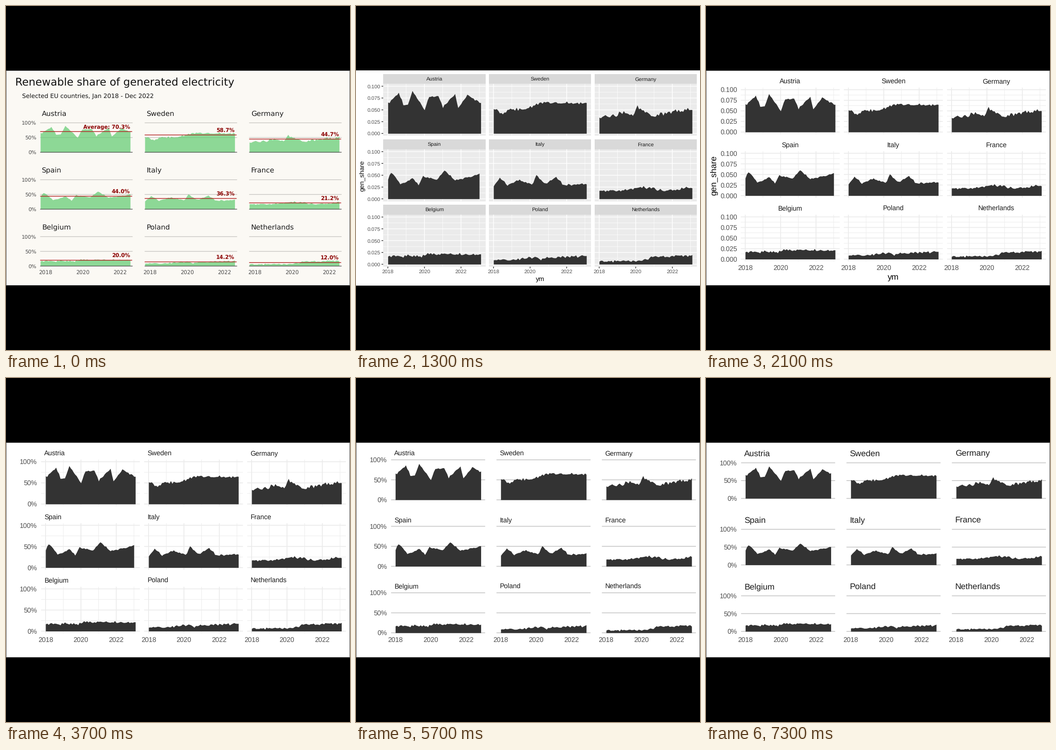
Recreate the animation shown at these times as a matplotlib script. Size 748 by 748 pixels, loop 8 s.

```python
import itertools

import numpy as np
import matplotlib.pyplot as plt
from matplotlib.animation import FuncAnimation
from matplotlib.patches import Rectangle

SIZE, DPI = 748, 88
PT = 72 / DPI  # points per pixel
SANS, WIDE = "Liberation Sans", "DejaVu Sans"
DARK, LABEL, PALE = "#333333", "#4d4d4d", "#ebebeb"

plt.rcParams["text.hinting"] = "none"
order = itertools.count(1)
countries = []


def country(name, mean, noise, turns, last=61):
    """Monthly shares in percent: runs between turning points plus noise."""
    rng = np.random.default_rng(len(countries) + 3)
    months = np.arange(last + 1)
    share = np.interp(months, list(turns), list(turns.values()))
    countries.append((name, mean, share + rng.normal(0, noise, months.size)))


country("Austria", 70.3, 1, {0: 64, 7: 87, 10: 60, 13: 62, 16: 90, 24: 50, 27: 78,
                             33: 79, 36: 57, 44: 84, 46: 53, 52: 82, 61: 65})
country("Sweden", 58.7, 1.6, {0: 53, 6: 42, 9: 50, 22: 53, 30: 66, 61: 64})
country("Germany", 44.7, 2.6, {0: 36, 10: 37, 16: 48, 22: 38, 25: 58, 35: 38,
                               49: 49, 61: 48})
country("Spain", 44.0, 1, {0: 40, 2: 58, 8: 31, 16: 43, 20: 30, 23: 49, 32: 40,
                           37: 61, 44: 39, 60: 53}, last=60)
country("Italy", 36.3, 1.3, {0: 27, 4: 46, 9: 29, 17: 42, 25: 31, 28: 51, 34: 32,
                             41: 47, 46: 29, 61: 32})
country("France", 21.2, 1.4, {0: 20, 12: 16, 28: 26, 44: 18, 61: 24})
country("Belgium", 20.0, 1.5, {0: 18, 23: 17, 26: 23, 61: 21})
country("Poland", 14.2, 1.9, {0: 11, 8: 9, 25: 16, 30: 12, 61: 20})
country("Netherlands", 12.0, 1.4, {0: 6, 22: 8, 32: 11, 34: 16, 61: 19})

fig = plt.figure(figsize=(SIZE / DPI, SIZE / DPI), dpi=DPI, facecolor="black")
pages = []


def page(back, edge):
    ax = fig.add_axes([0, 0, 1, 1], label=f"page{len(pages)}")
    ax.set_axis_off()
    ax.set_xlim(0, SIZE)
    ax.set_ylim(SIZE, 0)
    ax.set_autoscale_on(False)
    rect(ax, 0, 140, 748, 608, edge)
    rect(ax, 1, 141, 747, 607, back)
    pages.append(ax)
    return ax


def rect(ax, x0, y0, x1, y1, color):
    ax.add_patch(Rectangle((x0, y0), x1 - x0, y1 - y0, color=color, lw=0,
                           zorder=next(order)))


def hline(ax, ys, x0, x1, color, width):
    ax.hlines(ys, x0, x1, colors=color, linewidth=width * PT, snap=False,
              zorder=next(order))


def vline(ax, xs, y0, y1, color, width):
    ax.vlines(xs, y0, y1, colors=color, linewidth=width * PT, snap=False,
              zorder=next(order))


def text(ax, x, y, s, size, color, ha="left", font=SANS, **kw):
    kw.setdefault("va", "baseline")
    ax.text(x, y, s, fontsize=size * PT, color=color, ha=ha, family=font,
            zorder=next(order), **kw)


def area(ax, share, x0, step, zero, unit, end=61, color=DARK, alpha=1):
    share = share[:end + 1]
    xs = x0 + step * np.arange(share.size)
    ax.fill_between(xs, zero, zero - unit * share, color=color, alpha=alpha,
                    lw=0, zorder=next(order))


def year_marks(x0, step, end):
    xs = [x0 + step * m for m in range(0, 61, 12) if m <= end * 1.05]
    return xs[::2], xs[1::2]


def axis_titles(ax, left, right, base, x, size):
    text(ax, (left + right) / 2, base, "ym", size, "black", "center")
    text(ax, x, 369, "gen_share", size, "black", "center", va="center",
         rotation=90)


def styled():
    """The finished chart with colours, means and headings."""
    ax = page("#fbf9f4", "#505050")
    text(ax, 19.6, 173.5, "Renewable share of generated electricity", 23.15,
         "#111111", font=WIDE)
    text(ax, 35.2, 200.5, "Selected EU countries, Jan 2018 - Dec 2022", 13.15,
         "#111111", font=WIDE)
    for k, (name, mean, share) in enumerate(countries):
        row, col = divmod(k, 3)
        left, zero = 74.3 + 227.2 * col, 318 + 123.75 * row
        right = left + 201
        text(ax, left + 4, zero - 79.4, name, 15.4, "#1a1a1a", font=WIDE)
        hline(ax, [zero - 64, zero - 32], left, right, "#c4c2be", 1.3)
        area(ax, share, left + 0.4, 3.37, zero, 0.64, 58, "#5fcb6f", 0.7)
        hline(ax, zero, left, right, "#4a4a4a", 1.3)
        y = zero - 0.64 * mean
        hline(ax, y, left, right - 1, "#b22222", 1.5)
        lead = "Average: " if k == 0 else ""
        text(ax, left + 195.3, y - 5.5, f"{lead}{mean:.1f}%", 11.5, "#8b0000",
             "right", WIDE, weight="bold")
        if col == 0:
            for v in (0, 50, 100):
                text(ax, 66, zero - 0.64 * v + 4.2, f"{v}%", 11.2, LABEL,
                     "right", WIDE)
        if row == 2:
            for j in range(3):
                text(ax, left + 11.9 + 81 * j, 583.5, str(2018 + 2 * j), 11.6,
                     LABEL, "center", WIDE)


def grey(top=100, left=59.2, fmt=lambda v: f"{v / 1000:.3f}"):
    """Grey panels with strips; top is the upper limit of the share."""
    ax = page("white", "white")
    right, gap, height = 741, 7.4, 113
    width = (right - left - 2 * gap) / 3
    unit = height / (1.1 * top)
    step = width / 1.1 / 61
    ticks = range(0, int(top) + 1, 25)
    for k, (name, _, share) in enumerate(countries):
        row, col = divmod(k, 3)
        x, y = left + (width + gap) * col, 169.3 + 142.2 * row
        x1, y1 = x + width, y + height
        zero, start = y1 - 0.05 * top * unit, x + width * 0.05 / 1.1
        rect(ax, x, y - 21.6, x1, y, "#d9d9d9")
        rect(ax, x, y, x1, y1, PALE)
        text(ax, (x + x1) / 2, y - 6.6, name, 11.4, "#1a1a1a", "center")
        major, minor = year_marks(start, step, 61)
        levels = [zero - unit * v for v in ticks]
        hline(ax, [zero - unit * (v + 12.5) for v in range(0, 100, 25)], x, x1,
              "white", 0.75)
        vline(ax, minor, y, y1, "white", 0.75)
        hline(ax, levels, x, x1, "white", 1.5)
        vline(ax, major, y, y1, "white", 1.5)
        area(ax, share, start, step, zero, unit)
        if col == 0:
            hline(ax, levels, x - 3.7, x, DARK, 1.5)
            for v, level in zip(ticks, levels):
                text(ax, x - 6, level + 4.2, fmt(v), 11.4, LABEL, "right")
        if row == 2:
            vline(ax, major, y1, y1 + 3.7, DARK, 1.5)
            for j, mx in enumerate(major):
                text(ax, mx, 581.3, str(2018 + 2 * j), 11.4, LABEL, "center")
    axis_titles(ax, left, right, 597.8, 13.5, 14.3)


def minimal(left=76.3, gap=9.2, bottom=278.7, height=101.2, pitch=138.2, end=61,
            pad=0.05, percent=True, titles=False, align="left", grid=PALE,
            minors=True, years=True, strip=14.6, base=168.8, dark=False):
    """Bare panels without strips or ticks."""
    ax = page("black", "black") if dark else page("white", "#505050")
    right = 739.2
    width = (right - left - 2 * gap) / 3
    unit = height / (1 + 2 * pad) / 100
    step = width / 1.1 / end
    gaps = 50 if percent else 25
    ticks = range(0, 101, gaps)
    for k, (name, _, share) in enumerate(countries):
        row, col = divmod(k, 3)
        x, y1 = left + (width + gap) * col, bottom + pitch * row
        x1, y = x + width, y1 - height
        zero, start = y1 - 100 * pad * unit, x + width * 0.05 / 1.1
        major, minor = year_marks(start, step, end)
        levels = [zero - unit * v for v in ticks]
        if minors:
            hline(ax, [v - unit * gaps / 2 for v in levels[:-1]], x, x1, grid, 0.95)
        if years:
            vline(ax, minor, y, y1, grid, 0.95)
        hline(ax, levels, x, x1, grid, 1.8)
        if years:
            vline(ax, major, y, y1, grid, 1.8)
        area(ax, share, start, step, zero, unit, end)
        tx = x + 7 if align == "left" else (x + x1) / 2
        text(ax, tx, base + pitch * row, name, strip, "#1a1a1a", align)
        if col == 0:
            for v, level in zip(ticks, levels):
                label = f"{v}%" if percent else f"{v / 1000:.3f}"
                text(ax, 67.7, level + 5.2, label, 14.6, LABEL, "right")
        if row == 2:
            for j, mx in enumerate(major):
                text(ax, mx, 574, str(2018 + 2 * j), 14.6, LABEL, "center")
    if titles:
        axis_titles(ax, left, right, 595, 17, 18.4)


styled()
grey(90.5)
grey(left=63, fmt=lambda v: f"{v / 10:.1f}%")
grey()

# Each call below adds one more change to the look so far
look = dict(left=75.6, percent=False, titles=True, align="center")
minimal(**look, dark=True)
for change in (
    dict(),
    dict(titles=False),
    dict(align="left"),
    dict(left=76.3, percent=True),
    dict(minors=False),
    dict(gap=24.6, bottom=264.9, height=87, pitch=144.6),
    dict(end=58),
    dict(years=False, grid="#cacaca"),
    dict(pad=0),
    dict(pad=0.04),
    dict(strip=18.2, height=85.2, base=171),
    dict(height=83.6, base=176.5),
    dict(base=169.6),
):
    look.update(change)
    minimal(**look)

# Page starts in tenths of a second: even steps, one of them doubled
starts = np.cumsum([0, 5] + [4] * 6 + [8] + [4] * 9)


def update(i):
    now = np.searchsorted(starts, i, "right") - 1
    for k, ax in enumerate(pages):
        ax.set_visible(k == now)
    return pages


anim = FuncAnimation(fig, update, frames=80, interval=100, repeat=True,
                     repeat_delay=0, blit=False)
plt.show()
```
